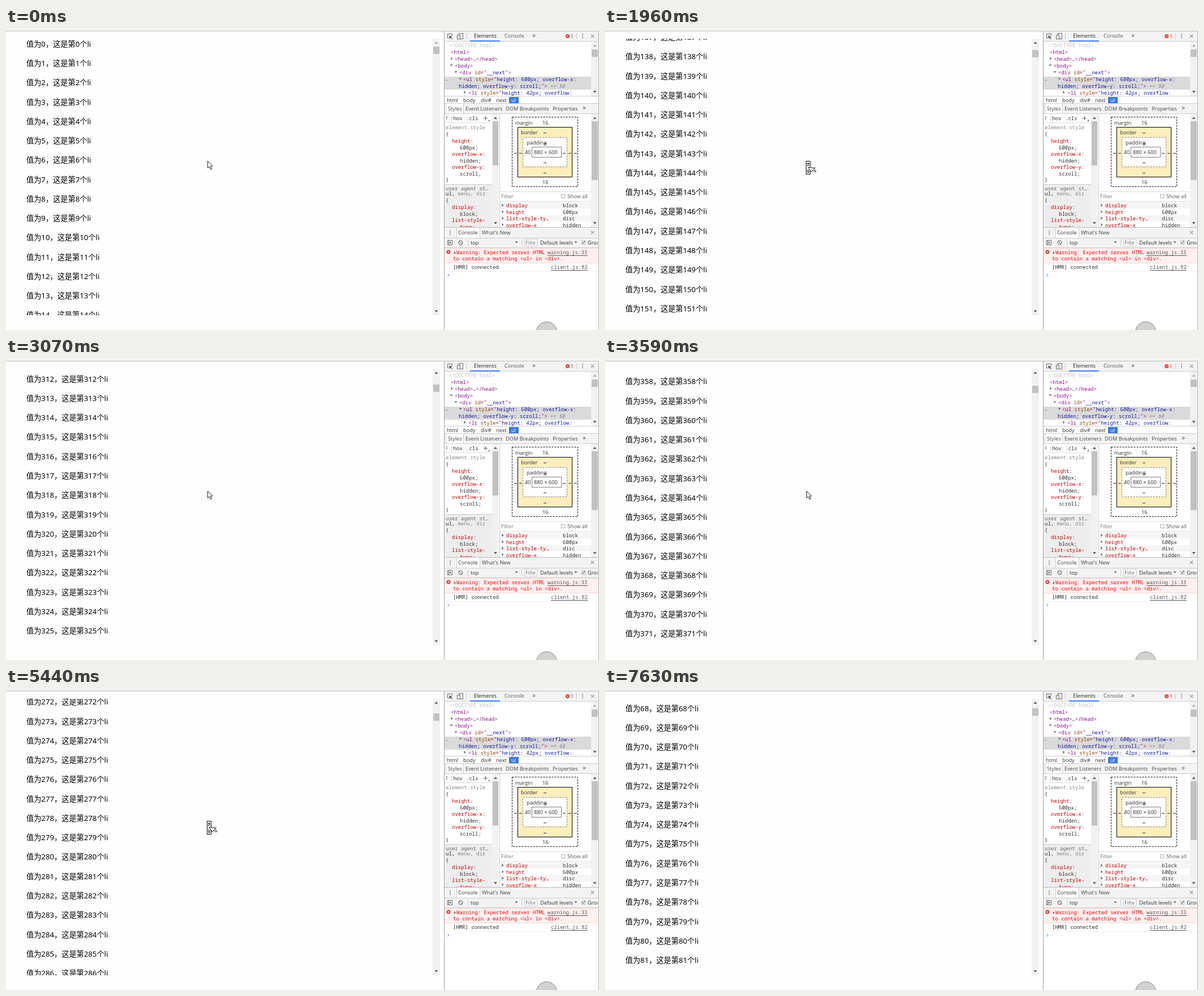
These frames come from a looping animation (1048x534 px, 7.86 s). An HTML page with a canvas:

```html
<!DOCTYPE html>
<html lang="zh-CN">
<head>
<meta charset="utf-8">
<style>
html, body { margin: 0; width: 100%; height: 100%; overflow: hidden; background: #fefefe; }
canvas { display: block; }
</style>
</head>
<body>
<canvas id="stage" width="1048" height="534"></canvas>
<script>
const ctx = document.getElementById('stage').getContext('2d');
const LOOP = 7860, ROW = 34.27;
const LIST = '13.2px "Noto Sans", "Noto Sans CJK SC", sans-serif';
const UI = '9.25px "Open Sans", "Noto Sans", sans-serif';
const MORE = '12px "Open Sans", "Noto Sans", sans-serif';
const MONO = '9px "Noto Sans Mono", "DejaVu Sans Mono", monospace';
const TAG = '#881280', ATTR = '#994500', VALUE = '#1a1aa6', RED = '#c80000', INK = '#303030';

// [time, first row at the top], held until the next entry
const scrollSteps = [
  [0, 0], [640, 2.4], [870, 9.88], [1250, 39.56], [1650, 90.68], [1960, 137.34],
  [2190, 172.9], [2420, 209.34], [2720, 258.48], [3070, 311.74], [3270, 347.27],
  [3590, 357.6], [4660, 356.39], [4980, 353.46], [5210, 337.68], [5360, 300.3],
  [5440, 272.1], [5760, 140.27], [5990, 67.77]
];
// [time, x, y] of the pointer tip
const pointerSteps = [
  [0, 356, 235], [6760, 368, 241], [6840, 448, 276], [6920, 598, 333],
  [7070, 904, 427], [7390, 1008, 492], [7470, 1047, 521], [7630, 1100, 560]
];
const at = (steps, t) => steps.findLast(s => s[0] <= t);

function rect(x, y, w, h, color) {
  ctx.fillStyle = color;
  ctx.fillRect(x, y, w, h);
}
const hline = (y, color = '#ccc', x = 775, end = 1047) => rect(x, y, end - x, 1, color);
const vline = (x, y, end, color = '#ccc') => rect(x, y, 1, end - y, color);

function frame(x, y, w, h, color, dash = []) {
  ctx.strokeStyle = color;
  ctx.lineWidth = 1;
  ctx.setLineDash(dash);
  ctx.strokeRect(x + .5, y + .5, w, h);
  ctx.setLineDash([]);
}

function shape(points, fill, stroke, close = true) {
  ctx.beginPath();
  points.forEach(([x, y]) => ctx.lineTo(x, y));
  if (close) ctx.closePath();
  if (fill) { ctx.fillStyle = fill; ctx.fill(); }
  if (stroke) { ctx.strokeStyle = stroke; ctx.lineWidth = 1; ctx.stroke(); }
}

function disc(x, y, r, fill, stroke) {
  ctx.beginPath();
  ctx.arc(x, y, r, 0, 7);
  if (fill) { ctx.fillStyle = fill; ctx.fill(); }
  if (stroke) { ctx.strokeStyle = stroke; ctx.lineWidth = 1; ctx.stroke(); }
}

// y is the middle of the line; runs alternate colour and text
function write(font, x, y, ...runs) {
  ctx.font = font;
  for (let i = 0; i < runs.length; i += 2) {
    ctx.fillStyle = runs[i];
    ctx.fillText(runs[i + 1], x, y + 3.3);
    x += ctx.measureText(runs[i + 1]).width;
  }
}
const mono = (x, y, ...runs) => write(MONO, x, y, ...runs);
const ui = (x, y, text, color = INK) => write(UI, x, y, color, text);

function arrow(x, y, dir, color = '#505050', s = 3) {
  const d = s * .6;
  const points = {
    up: [[-s, d], [s, d], [0, -d]],
    down: [[-s, -d], [s, -d], [0, d]],
    right: [[-d, -s], [d, 0], [-d, s]]
  }[dir];
  shape(points.map(p => [x + p[0], y + p[1]]), color);
}

function scrollbar(x, y, w, h, thumbY, thumbH, upColor = '#505050') {
  rect(x, y, w, h, '#f1f1f1');
  rect(x + 1, thumbY, w - 2, thumbH, '#c1c1c1');
  arrow(x + w / 2, y + 7, 'up', upColor);
  arrow(x + w / 2, y + h - 7, 'down');
}

function cross(x, y, r, color) {
  shape([[x - r, y - r], [x + r, y + r]], null, color, false);
  shape([[x + r, y - r], [x - r, y + r]], null, color, false);
}

function dots(x, y) {
  for (const d of [-3, 0, 3]) rect(x - .7, y + d - .7, 1.5, 1.5, '#5a5a5a');
}

function clipped(x, y, w, h, draw) {
  ctx.save();
  ctx.beginPath();
  ctx.rect(x, y, w, h);
  ctx.clip();
  draw();
  ctx.restore();
}

function drawList(scroll) {
  clipped(30, 19, 720, 489, () => {
    const first = Math.max(0, Math.floor(scroll) - 1);
    for (let n = first; n < first + 18; n++) {
      ctx.font = LIST;
      ctx.fillStyle = '#000';
      ctx.fillText(`值为${n}，这是第${n}个li`, 36, 32.7 + (n - scroll) * ROW);
    }
  });
  scrollbar(754, 19, 13, 489, Math.round(33 + scroll * .0449), 13, scroll ? '#505050' : '#a3a3a3');
}

function drawElements() {
  rect(775, 6, 273, 17, '#f3f3f3');
  hline(23);
  frame(780, 10, 8, 7, '#6e6e6e');
  rect(784, 14, 6, 5, '#f3f3f3');
  shape([[783, 13], [789, 15.5], [786.5, 16.5], [789, 19], [788, 20], [785.5, 17.5], [784.5, 19]], '#5a5a5a');
  frame(800, 9, 7, 10, '#6e6e6e');
  rect(797, 12, 6, 8, '#f3f3f3');
  frame(797, 12, 5, 7, '#6e6e6e');
  vline(813, 9, 20);
  ui(827, 14, 'Elements', '#222');
  rect(820, 22, 53, 2, '#3b7ded');
  ui(881, 14, 'Console', '#5a5a5a');
  write(MORE, 930, 14, '#5a5a5a', '»');
  disc(992.5, 14.5, 3.5, '#db3b30');
  cross(992.5, 14.5, 1.3, '#fff');
  ui(998, 14.5, '1', '#c33');
  vline(1008, 9, 20);
  dots(1019, 14);
  cross(1036.5, 14.5, 2.7, '#5a5a5a');

  rect(775, 86, 259, 23, '#dadada');
  clipped(775, 24, 259, 96, () => {
    mono(783, 31, '#c0c0c0', '<!DOCTYPE html>');
    mono(786, 43, TAG, '<html>');
    arrow(788, 54, 'right', '#6e6e6e', 2.7);
    mono(793, 55, TAG, '<head>', INK, '…', TAG, '</head>');
    arrow(787, 66, 'down', '#6e6e6e', 2.7);
    mono(793, 67, TAG, '<body>');
    arrow(795, 78, 'down', '#6e6e6e', 2.7);
    mono(801, 79, TAG, '<div ', ATTR, 'id', TAG, '="', VALUE, '__next', TAG, '">');
    mono(776, 90, '#777', '…');
    arrow(803, 90, 'down', '#6e6e6e', 2.7);
    mono(808, 91, TAG, '<ul ', ATTR, 'style', TAG, '="', VALUE, 'height: 600px; overflow-x:');
    mono(800, 103, VALUE, 'hidden; overflow-y: scroll;', TAG, '">');
    write('italic ' + MONO, 961, 103, '#8a8a8a', '== $0');
    arrow(811, 113.5, 'right', '#6e6e6e', 2.7);
    mono(817, 115, TAG, '<li ', ATTR, 'style', TAG, '="', VALUE, 'height: 42px; overflow:');
  });
  scrollbar(1034, 24, 13, 96, 38, 13, '#a3a3a3');

  hline(120);
  rect(889, 122, 17, 11, '#3879d9');
  [[779, 'html'], [808, 'body'], [839, 'div#'], [866, 'next']].forEach(([x, s]) => ui(x, 128, s));
  ui(893, 128, 'ul', '#fff');
  hline(133);
}

function drawStyles() {
  rect(775, 134, 272, 17, '#f3f3f3');
  rect(777, 134, 31, 18, '#fff');
  vline(777, 134, 151);
  vline(808, 134, 151);
  hline(151);
  [[781, 'Styles'], [812, 'Event Listeners'], [883, 'DOM Breakpoints'], [966, 'Properties']]
    .forEach(([x, s]) => ui(x, 143, s, '#444'));
  write(MORE, 1019, 142, '#5a5a5a', '»');

  clipped(775, 152, 84, 200, () => {
    clipped(775, 152, 6, 15, () => ui(777, 160, 'F', '#777'));
    mono(785, 160, INK, ':hov');
    mono(813, 160, INK, '.cls');
    rect(844, 159, 7, 1, '#5a5a5a');
    rect(847, 156, 1, 7, '#5a5a5a');
    shape([[855, 162], [855, 165], [852, 165]], '#5a5a5a');
    hline(167, '#ddd', 775, 859);
    mono(777, 176, '#888', 'element.style');
    mono(777, 188, INK, '{');
    const rule = (y, name, value) => {
      mono(788, y, RED, name, INK, ':');
      mono(802, y + 11.4, INK, value);
    };
    rule(200, 'height', '600px;');
    rule(223, 'overflow-x', 'hidden;');
    rule(246, 'overflow-y', 'scroll;');
    mono(777, 269, INK, '}');
    rect(775, 276, 84, 76, '#ededed');
    hline(276, '#ccc', 775, 859);
    mono(777, 284, '#666', 'user agent st…');
    mono(777, 293, INK, 'ul,', '#888', ' menu, dir');
    mono(777, 305, INK, '{');
    rule(317, 'display', 'block;');
    mono(788, 340, RED, 'list-style-');
    mono(802, 351.5, RED, 'type', INK, ':');
  });
  scrollbar(859, 152, 12, 200, 165, 78);
  vline(872, 152, 352);
}

function drawBoxModel() {
  frame(894, 157, 116, 123, '#000', [3, 2]);
  rect(904, 175, 96, 88, '#fdeebc');
  frame(904, 175, 96, 88, '#000');
  rect(913, 193, 78, 52, '#fff');
  frame(913, 193, 78, 52, '#808080', [3, 2]);
  frame(929, 210, 52, 18, '#808080');
  const labels = [
    [900, 167.5, 'margin'], [948, 167.5, '16'], [910, 184.5, 'border'], [920, 202.5, 'padding'],
    [917, 220, '40'], [933, 220, '880 × 600'], [948, 272.5, '16']
  ];
  labels.forEach(([x, y, s]) => ui(x, y, s));
  const dashes = [[950, 185], [951, 204], [950, 238], [950, 256], [898, 221], [907, 221], [984, 221], [994, 221], [1004, 221]];
  dashes.forEach(([x, y]) => rect(x, y, 5, 1, INK));

  hline(289, '#ddd', 873, 1034);
  ui(875, 298, 'Filter', '#777');
  frame(981, 294, 6, 6, '#b0b0b0');
  ui(992, 298, 'Show all', '#555');
  hline(306, '#ddd', 873, 1034);
  clipped(873, 307, 161, 45, () => {
    const props = [['display', 'block'], ['height', '600px'], ['list-style-ty…', 'disc'], ['overflow-x', 'hidden']];
    props.forEach(([name, value], i) => {
      const y = 314 + i * 11.4;
      if (i % 2 === 0) rect(873, y - 6, 161, 11.4, '#f5f5f5');
      arrow(878, y - .5, 'right', '#6e6e6e', 2.7);
      mono(884, y, RED, name);
      mono(984, y, INK, value);
    });
  });
  scrollbar(1034, 152, 13, 200, 165, 104);
}

function drawConsole() {
  rect(775, 352, 272, 36, '#f3f3f3');
  hline(352, '#bbb');
  rect(796, 353, 41, 18, '#fff');
  vline(796, 353, 371);
  vline(837, 353, 371);
  dots(785, 362);
  ui(799, 362, 'Console', '#333');
  ui(841, 362, "What's New", '#444');
  cross(1036.5, 361.5, 2.7, '#5a5a5a');
  hline(371);

  frame(780, 375, 8, 8, '#6e6e6e');
  vline(782, 375, 384, '#6e6e6e');
  arrow(785.5, 379.5, 'right', '#5a5a5a', 2.3);
  disc(803.5, 379.5, 3.6, null, '#5a5a5a');
  shape([[801, 377], [806, 382]], null, '#5a5a5a', false);
  vline(816, 374, 385);
  ui(821, 379.5, 'top');
  arrow(902, 379, 'down', '#5a5a5a', 2.5);
  vline(911, 374, 385);
  rect(916, 373, 23, 13, '#fff');
  frame(916, 373, 22, 12, '#ccc');
  ui(918, 379.5, 'Filte', '#666');
  ui(944, 379.5, 'Default levels');
  arrow(1007, 379, 'down', '#5a5a5a', 2.5);
  rect(1017, 376, 7, 7, '#fff');
  frame(1017, 376, 6, 6, '#b0b0b0');
  shape([[1018.5, 379], [1020, 381], [1023, 376.5]], null, '#333', false);
  clipped(1025, 372, 21, 16, () => ui(1028, 379.5, 'Group'));
  hline(388);

  rect(775, 389, 272, 26, '#fff0f0');
  hline(389, '#ffd6d6');
  hline(415, '#ffd6d6');
  disc(782, 396, 3.5, '#db3b30');
  cross(782, 396, 1.3, '#fff');
  arrow(793.5, 397.5, 'right', '#6e6e6e', 2.7);
  mono(796, 397, '#f00', 'Warning: Expected server HTML');
  mono(790, 408, '#f00', 'to contain a matching <ul> in <div>.');
  mono(957, 397, '#545454', 'warning.js:33');
  hline(402, '#545454', 957, 1028);
  mono(790, 423, INK, '[HMR] connected');
  mono(963, 423, '#545454', 'client.js:82');
  hline(428, '#545454', 963, 1028);
  hline(430, '#f0f0f0');
  shape([[780.5, 434.5], [783, 437], [780.5, 439.5]], null, '#3b7ded', false);
  disc(955.5, 537.5, 18, '#d2d2d2', '#858585');
}

function drawPointer(x, y) {
  const outline = [[0, 0], [0, 12], [2.8, 9.6], [5, 14.5], [7, 13.6], [4.9, 8.8], [8.6, 8.6]];
  shape(outline.map(p => [x + .5 + p[0], y + .5 + p[1]]), '#fff', '#222');
}

function drawAutoscroll() {
  rect(355, 235, 8, 24, '#000');
  rect(356, 236, 6, 22, '#fff');
  arrow(359, 239, 'up', '#000', 2.3);
  arrow(359, 255, 'down', '#000', 2.3);
  rect(357, 242, 4, 1, '#000');
  rect(357, 251, 4, 1, '#000');
  shape([[359, 246.5], [371.5, 247.5], [368.5, 250], [373, 253], [371.5, 254.8], [366.5, 251.5], [364.5, 254.5]], '#fff', '#111');
}

function draw(t) {
  rect(0, 0, 1048, 534, '#fefefe');
  rect(0, 0, 1048, 5, '#f3f3f3');
  hline(5, '#bdbdbd', 0, 1048);
  drawList(at(scrollSteps, t)[1]);
  rect(775, 6, 273, 528, '#fff');
  drawElements();
  drawStyles();
  drawBoxModel();
  drawConsole();
  vline(774, 6, 534, '#a3a3a3');
  vline(1047, 6, 534, '#b0b0b0');
  const autoscroll = (t >= 320 && t < 3070) || (t >= 4430 && t < 5990);
  if (autoscroll) drawAutoscroll();
  else drawPointer(...at(pointerSteps, t).slice(1));
}

const start = performance.now();
function tick() {
  draw((performance.now() - start) % LOOP);
  requestAnimationFrame(tick);
}
tick();
</script>
</body>
</html>
```
